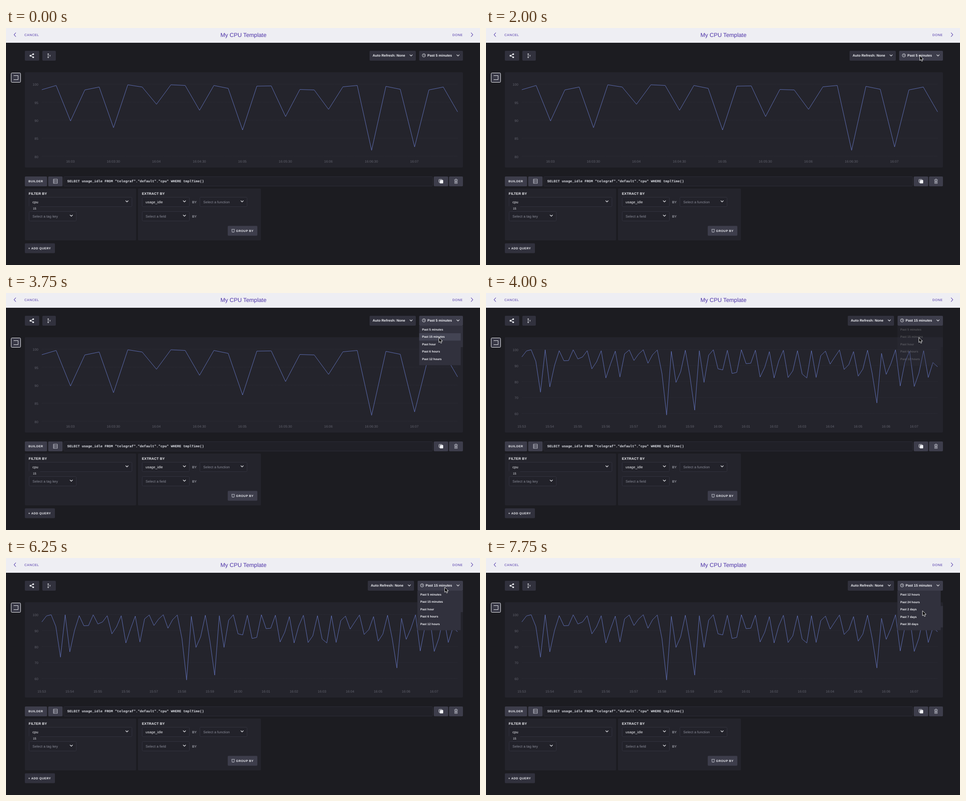
Animation of 1056 by 530 pixels, one loop 8000 ms. Source, as an HTML page:

```html
<!DOCTYPE html>
<html lang="en">
<head>
<meta charset="utf-8">
<title>CPU template editor</title>
<style>
  html, body { margin: 0; width: 100%; height: 100%; overflow: hidden; background: #1c1c21; }
  svg { display: block; width: 1056px; height: 530px; }
  text { font-family: "Liberation Sans", Arial, sans-serif; text-rendering: geometricPrecision; white-space: pre; }
  .mono { font-family: "Liberation Mono", "Courier New", monospace; }
</style>
</head>
<body>
<svg id="stage" viewBox="0 0 1056 530" xmlns="http://www.w3.org/2000/svg">
  <g id="base"></g>
  <g id="live"></g>
</svg>
<script>
const LOOP = 8000;
const C = {
  page: '#1c1c21', panel: '#24242c', button: '#31313d', raised: '#3d3d4b',
  edge: '#32323e', white: '#f0f1f5', soft: '#c3c5cf', hint: '#8b8d9a',
  axis: '#60616c', grid: '#30303a', line: '#6678c4', purple: '#4d33a8'
};

// Drawing helpers
const rect = (x, y, x2, y2, fill, extra = 'rx="2"') =>
  `<rect x="${x}" y="${y}" width="${x2 - x}" height="${y2 - y}" fill="${fill}" ${extra}/>`;

const stroke = (d, color, width = 1, extra = '') =>
  `<path d="${d}" fill="none" stroke="${color}" stroke-width="${width}" ${extra}/>`;

// y is the middle of the capital letters
function label(str, x, y, size, fill, { bold, gap = 0, anchor = 'start', cls = '' } = {}) {
  return `<text x="${x}" y="${y + size * 0.36}" font-size="${size}" fill="${fill}" class="${cls}"` +
    ` font-weight="${bold ? 700 : 400}" letter-spacing="${gap}" text-anchor="${anchor}">${str}</text>`;
}

const caret = (x, y) => stroke(`M${x - 3} ${y - 1.5}l3 3l3 -3`, C.white, 1.2);
const caps = (str, x, y) => label(str, x, y, 6.6, C.white, { bold: true, gap: 0.5 });

function select(x, y, x2, str, filled) {
  return rect(x + 0.5, y + 0.5, x2 - 0.5, y + 21.5, '#22222a', `rx="2" stroke="${C.edge}"`) +
    label(str, x + 8, y + 11, 7.8, filled ? C.white : C.hint, { gap: 0.08 }) +
    caret(x2 - 11.5, y + 9.5);
}

function baseArt() {
  const head = rect(0, 0, 1056, 33, '#eeeef3', '') +
    stroke('M22 10.5l-4 4.5l4 4.5M1036 10.5l4 4.5l-4 4.5', C.purple, 1.1) +
    label('CANCEL', 41, 15.3, 7.3, C.purple, { gap: 0.5 }) +
    label('DONE', 994.5, 15.3, 7.3, C.purple, { gap: 0.5 }) +
    label('My CPU Template', 529, 15.8, 12.75, C.purple, { anchor: 'middle' });

  const tools = rect(42, 51, 74, 73, C.button) + rect(81, 51, 111, 73, C.button) +
    stroke('M60.5 58.7L54.5 62L60.5 65.2', C.white, 1.1) +
    [[60.6, 58.6], [54.4, 62], [60.6, 65.3]]
      .map(([x, y]) => `<circle cx="${x}" cy="${y}" r="1.9" fill="${C.white}"/>`).join('') +
    stroke('M94 57.5v9M92.5 58.8l1.5 -1.8l1.5 1.8M92.5 65.2l1.5 1.8l1.5 -1.8', C.white, 1) +
    label('Y', 96.3, 61.8, 5.2, C.white, { bold: true });

  const toggle = rect(11.5, 100.5, 32.5, 121.5, '#383846', `rx="2" stroke="${C.white}"`) +
    stroke('M17 106.5h10v9h-10', C.white, 1);

  const query = rect(42, 332, 91.5, 354, C.raised) + caps('BUILDER', 50, 342.8) +
    rect(94, 332, 126, 354, C.raised) +
    stroke('M105.5 338h9v9.5h-9zM105.5 341.2h9M105.5 344.4h9M107 339.6h1M107 342.8h1M107 346h1', C.soft, 0.9) +
    rect(128.5, 332.5, 950.5, 353.5, '#202027', 'rx="2" stroke="#2c2c36"') +
    label('SELECT usage_idle FROM "telegraf"."default"."cpu" WHERE tmplTime()',
      136.6, 342.3, 7.7, '#dfe1e8', { bold: true, cls: 'mono' }) +
    rect(953, 332, 985, 354, C.raised) +
    rect(964.5, 338.5, 971.5, 345.5, C.raised, `rx="1" stroke="${C.white}" stroke-width=".9"`) +
    rect(966.5, 340, 974, 347.5, C.white, 'rx="1"') +
    rect(987, 332, 1018, 354, C.raised) +
    stroke('M998.5 339.5h8M1001 339v-1.2h3v1.2M999.5 340v7.6h6v-7.6M1001.3 341v5.5M1002.5 341v5.5M1003.7 341v5.5', C.soft, 0.8);

  const heading = (str, x) => label(str, x, 369.8, 7.7, C.white, { bold: true, gap: 0.18 });
  const by = y => label('BY', 414.8, y, 7.5, C.soft);
  const builder = rect(42, 359, 290, 475, C.panel) + rect(294, 359, 568, 475, C.panel) +
    heading('FILTER BY', 50.5) + heading('EXTRACT BY', 302.8) +
    select(51, 378, 281, 'cpu', true) +
    rect(52, 398, 76, 409, C.panel, '') + label('15', 60, 404, 6.7, C.white) +
    select(51, 410, 157, 'Select a tag key') +
    select(303, 378, 409, 'usage_idle', true) + by(388.8) +
    select(431.5, 378, 537.5, 'Select a function') +
    select(303, 410, 409, 'Select a field') + by(421.2) +
    rect(494, 442.5, 560, 464.5, C.raised) +
    stroke('M502.5 450.2h7M503.3 450.5l.5 6h4.4l.5 -6', C.soft, 1) +
    caps('GROUP BY', 512.6, 453.2) +
    rect(42, 481.5, 109, 503.5, C.button) + caps('+ ADD QUERY', 49.8, 492.3);

  return head + tools + toggle + rect(42, 99, 1018, 312, C.panel) + query + builder;
}

// Charts: heights of evenly spaced samples
const five = {
  ys: [138, 128.5, 208, 138.5, 132, 223, 127, 132, 170.5, 127, 128.5, 184, 128.5, 135, 228,
    130, 129.5, 198, 137.5, 138.5, 182, 131.5, 128.5, 273.5, 130.5, 137, 266, 138.5, 132, 187.5],
  grid: { top: 125.5, gap: 40.35, from: 100, by: 5 },
  ticks: { x: 143.4, gap: 95.8, count: 9, start: 963 * 60, by: 30 }
};
const fifteen = {
  ys: [143, 129.5, 127, 153, 222, 127, 210, 162, 129, 151.5, 151, 127, 147.5, 143, 129,
    169.5, 154, 129, 190, 158.5, 130, 188, 136, 127.5, 151, 136.5, 127, 157, 138, 127.5,
    180, 273, 130.5, 200, 176, 128, 187, 262, 129, 200, 139, 127, 169.5, 172, 128,
    180, 177.5, 127, 158, 157, 128, 188, 166, 131, 190, 152, 128, 189, 174, 129,
    181, 190, 129, 189, 140, 130, 159, 143, 127.5, 171, 160, 131, 186, 170, 128,
    180, 246, 135, 182, 158, 127, 208, 155, 130, 209, 179, 129, 189, 155.5, 165],
  grid: { top: 126.5, gap: 35.75, from: 100, by: 10 },
  ticks: { x: 79.5, gap: 62.45, count: 15, start: 953 * 60, by: 60 }
};

function clock(sec) {
  const two = n => String(n).padStart(2, '0');
  const s = sec % 60;
  return two(Math.floor(sec / 3600)) + ':' + two(Math.floor(sec / 60) % 60) + (s ? ':' + two(s) : '');
}

function chart({ ys, grid, ticks }) {
  let out = '';
  for (let i = 0; i < 5; i++) {
    const y = grid.top + i * grid.gap;
    out += stroke(`M80 ${y}H1006`, C.grid, 0.8, 'stroke-dasharray="2 1.4"') +
      label(grid.from - i * grid.by, 72, y + 1, 7.6, C.axis, { anchor: 'end' });
  }
  for (let i = 0; i < ticks.count; i++) {
    out += label(clock(ticks.start + i * ticks.by), ticks.x + i * ticks.gap, 298, 7.6, C.axis, { anchor: 'middle' });
  }
  const step = 926.3 / (ys.length - 1);
  const pts = ys.map((y, i) => `${(79.8 + i * step).toFixed(1)} ${y}`).join('L');
  return out + stroke('M' + pts, C.line, 0.9, 'stroke-linejoin="round"');
}

function buttons(wide, hot) {
  const dx = wide ? -4 : 0;
  const bold = { bold: true };
  return rect(810 + dx, 51, 913 + dx, 73, C.button) +
    label('Auto Refresh: None', 816.8 + dx, 61, 7.72, C.white, bold) + caret(902.5 + dx, 61.2) +
    rect(920.5 + dx * 0.9, 51, 1018, 73, hot ? C.raised : C.button) +
    `<circle cx="${931 + dx}" cy="61.2" r="3.6" fill="none" stroke="${C.white}" stroke-width=".9"/>` +
    stroke(`M${931 + dx} 59v2.4h1.8`, C.white, 0.8) +
    label(wide ? 'Past 15 minutes' : 'Past 5 minutes', 938.8 + dx, 61, 7.78, C.white, bold) +
    caret(1007, 61.2);
}

const ranges = ['5 minutes', '15 minutes', 'hour', '6 hours', '12 hours', '24 hours', '2 days', '7 days', '30 days'];

function menu({ wide, alpha = 1, pitch = 16.6, scroll = 0, hover = -1 }) {
  const x = wide ? 916.5 : 920.5;
  const thumb = 73 + scroll * 0.52;
  let rows = '';
  ranges.forEach((name, i) => {
    const y = 81.2 + i * pitch - scroll;
    if (i === hover) rows += rect(x, y - 7.8, 1013, y + 8.6, '#434453', '');
    rows += label('Past ' + name, x + 6.5, y, 6.65, C.white, { bold: true });
  });
  return `<g opacity="${alpha}">` + rect(x, 73, 1013, 161.5, C.button, '') +
    rect(1013, thumb, 1018, thumb + 48, C.button, '') +
    `<g clip-path="url(#menuClip)">${rows}</g></g>`;
}

const pointer = (x, y) =>
  `<path transform="translate(${x} ${y})" d="M.4 .4V11.6L3 9.3L4.8 13.3L6.8 12.4L5.1 8.6H8.5Z"` +
  ` fill="#000" stroke="#fff" stroke-width=".9" stroke-linejoin="round"/>`;

// Each step adds to the state before it
const steps = [
  [0, {}],
  [500, { at: [853, 33] }],
  [750, { at: [927, 52] }],
  [1000, { at: [946, 51] }],
  [1250, { at: [953, 50] }],
  [1750, { at: [963, 58] }],
  [2000, { at: [966, 61], hot: true }],
  [2250, { at: [969, 62], open: true, pitch: 16.3 }],
  [2500, { pitch: 16.6 }],
  [3250, { at: [966, 78] }],
  [3500, { at: [964, 98], hover: 1 }],
  [3750, { at: [964, 99] }],
  [4000, { wide: true, alpha: 0.25, hover: -1 }],
  [4250, { open: false, alpha: 1 }],
  [5500, { at: [972, 79], hot: false }],
  [5750, { at: [977, 65], hot: true }],
  [6000, { open: true, pitch: 16.3 }],
  [6250, { pitch: 16.6 }],
  [6750, { at: [984, 117] }],
  [7000, { at: [977, 117] }],
  [7250, { at: [972, 117], scroll: 30 }],
  [7500, { scroll: 62 }],
  [7750, { at: [972, 117.5], scroll: 66 }]
];
let last = {};
const states = steps.map(([time, change]) => (last = { ...last, ...change, time }));

const live = document.getElementById('live');
document.getElementById('base').innerHTML =
  '<clipPath id="menuClip"><rect x="900" y="73" width="118" height="88.5"/></clipPath>' + baseArt();

function draw(s) {
  live.innerHTML = chart(s.wide ? fifteen : five) + buttons(s.wide, s.hot) +
    (s.open ? menu(s) : '') + (s.at ? pointer(...s.at) : '');
}

let shown = null;
const begin = performance.now();
function tick() {
  const t = (performance.now() - begin) % LOOP;
  const state = states.filter(s => s.time <= t).pop();
  if (state !== shown) draw(shown = state);
  requestAnimationFrame(tick);
}
tick();
</script>
</body>
</html>
```
